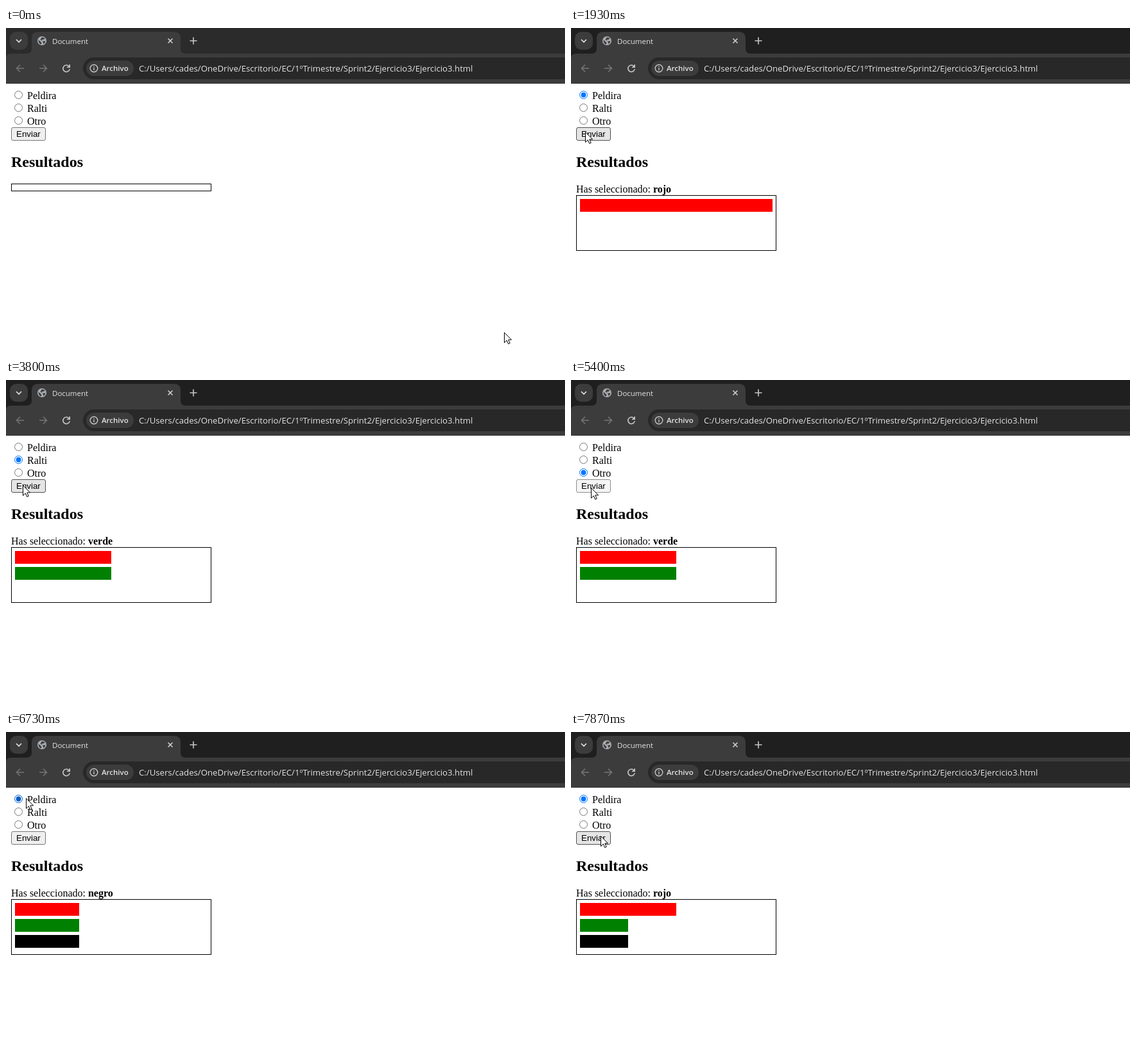
Recreate the animation shown at these times as an HTML page. Size 871 px wide and 506 px high, loop 8 s.

```html
<!DOCTYPE html>
<html lang="es">
<head>
<meta charset="utf-8">
<title>Document</title>
<style>
  html, body { margin: 0; width: 100%; height: 100%; overflow: hidden; background: #fff; }
  svg { display: block; cursor: default; user-select: none; }
  .ui { font-family: "Open Sans", "Noto Sans", sans-serif; fill: #e3e3e3; }
  .page { font: 16px "Liberation Serif", serif; }
  .bold { font-weight: bold; }
  .icon { fill: none; stroke: #c7c7c7; stroke-width: 1.6; }
  .off { stroke: #757575; }
</style>
</head>
<body>
<svg width="871" height="506" viewBox="0 0 871 506">
  <rect id="strip" width="871" height="50"/>
  <path fill="#3c3c3c" d="M0 87V48Q0 40 8 40H32Q40 40 40 32V16Q40 6 50 6H262Q272 6 272 16V32Q272 40 280 40H871V87Z"/>
  <rect x="6" y="6" width="28" height="28" rx="10" fill="#3c3c3c"/>
  <path class="icon" style="stroke:#e3e3e3" d="M16 18l4 4 4-4"/>

  <circle cx="56" cy="20" r="7" fill="#a9adb2"/>
  <path fill="#3c3c3c" d="M50.5 18.5l4 3.5 1 1.5-1 2.2q-4-1.5-4-7.200zM56 14.500l4.500 1.200-1 2-2.500 0 -1.500 2-2-1.500zM57 20.500l4.500 0q-.5 3-3 4.500z"/>
  <path class="icon" d="M252.500 16.500l7 7m0-7l-7 7M292 14.500v11M286.500 20h11"/>

  <g class="icon">
    <path class="off" d="M28 63H17M22 57.500L16.500 63l5.500 5.500M52 63h11M58 57.500l5.500 5.500-5.500 5.500"/>
    <path d="M98.500 60.500a5.200 5.200 0 1 0 .7 3.500M99.200 57v4.200h-4.200"/>
  </g>
  <rect x="120" y="46" width="780" height="34" rx="17" fill="#282828"/>
  <rect x="125" y="51" width="74" height="24" rx="12" fill="#3c3c3c"/>
  <circle class="icon" cx="137" cy="63" r="5.800" style="stroke-width:1.400"/>
  <path class="icon" style="stroke-width:1.400" d="M137 62v4M137 59.500v1.400"/>
  <g class="ui">
    <text x="72" y="25" font-size="11.500">Document</text>
    <text x="149" y="67" font-size="11.500" font-weight="600">Archivo</text>
    <text x="207" y="68" font-size="13.200">C:/Users/cades/OneDrive/Escritorio/EC/1ºTrimestre/Sprint2/Ejercicio3/Ejercicio3.html</text>
  </g>

  <g class="page">
    <g id="options"></g>
    <rect id="button" x="8.500" y="155.500" width="53" height="20" rx="2.500"/>
    <text x="16" y="170" style="font:13.333px 'Liberation Sans',sans-serif">Enviar</text>
    <text class="bold" x="8" y="217" font-size="24">Resultados</text>
    <text id="message" x="8" y="257">Has seleccionado: <tspan id="choice" class="bold"></tspan></text>
    <rect id="frame" x="8.500" width="311" fill="none" stroke="#000"/>
    <g id="bars"></g>
  </g>
  <path id="cursor" fill="#fff" stroke="#000" d="M.5.7V16.500L4.300 12.900 6.700 18.400 9.200 17.300 6.800 11.900H11.600Z"/>
</svg>
<script>
const $ = id => document.getElementById(id);
const LOOP = 8000, BUTTON = 3;
const labels = ["Peldira", "Ralti", "Otro"];
const colors = ["red", "green", "black"];
const colorNames = ["rojo", "verde", "negro"];

// [start, end, x, y]: pointer moves
const moves = [
  [0, 600, 11, 101], [730, 870, 15, 103], [1270, 1530, 22, 162],
  [2130, 2730, 22, 125], [3070, 3470, 26, 164], [4000, 4130, 28, 146],
  [4730, 5070, 31, 168], [5670, 6470, 31, 103], [6730, 7200, 40, 160],
  [7530, 7670, 43, 149], [7670, 7870, 46, 162]
];
// [press, release, target]: options 0-2 or the button
const clicks = [
  [1130, 1270, 0], [1800, 1930, BUTTON], [2870, 3000, 1], [3670, 3800, BUTTON],
  [4600, 4730, 2], [5400, 5530, BUTTON], [6600, 6730, 0], [7400, 7530, BUTTON]
];

$("options").innerHTML = labels.map((label, i) => `
  <g transform="translate(0 ${20 * i})">
    <circle class="ring" cx="19.500" cy="104.500" r="6" fill="#fff"/>
    <circle class="dot" cx="19.500" cy="104.500" r="3.900"/>
    <text x="33" y="111">${label}</text>
  </g>`).join("");
$("bars").innerHTML = colors.map((c, i) =>
  `<rect x="14" y="${267 + 25 * i}" height="20" fill="${c}"/>`).join("");
const rings = document.querySelectorAll(".ring");
const dots = document.querySelectorAll(".dot");
const bars = document.querySelectorAll("#bars rect");

function pointer(t) {
  let x = 776, y = 475;
  for (const [start, end, toX, toY] of moves) {
    const p = Math.min(1, Math.max(0, (t - start) / (end - start)));
    const ease = p * p * (3 - 2 * p);
    x += (toX - x) * ease;
    y += (toY - y) * ease;
  }
  return [Math.round(x), Math.round(y)];
}

function targetAt([x, y]) {
  if (x >= 8 && x < 62 && y >= 155 && y < 176) return BUTTON;
  if (x >= 8 && x < 78 && y >= 95 && y < 155) return Math.floor((y - 95) / 20);
  return -1;
}

function draw(t) {
  let selected = -1, last = -1, pressed = -1;
  const votes = [0, 0, 0];
  for (const [press, release, target] of clicks) {
    if (t >= press && t < release) pressed = target;
    if (t < release) continue;
    if (target === BUTTON) votes[last = selected]++;
    else selected = target;
  }
  const hovered = targetAt(pointer(t - 65));
  const pick = (i, normal, hover, active) =>
    i === pressed ? active : i === hovered ? hover : normal;

  $("strip").setAttribute("fill", t < 1130 ? "#2b2b2b" : "#1f1f1f");
  rings.forEach((ring, i) => {
    const blue = pick(i, "#0075ff", "#005cc8", "#3793ff");
    const grey = pick(i, "#767676", "#4f4f4f", "#8d8d8d");
    ring.setAttribute("stroke", i === selected ? blue : grey);
    dots[i].setAttribute("fill", i === selected ? blue : "none");
  });
  $("button").setAttribute("fill", pick(BUTTON, "#efefef", "#e5e5e5", "#f5f5f5"));
  $("button").setAttribute("stroke", pick(BUTTON, "#767676", "#4f4f4f", "#8d8d8d"));

  const voted = last >= 0, total = votes.reduce((a, b) => a + b);
  $("message").style.display = voted ? "" : "none";
  $("choice").textContent = voted ? colorNames[last] : "";
  $("frame").setAttribute("y", voted ? 261.5 : 243.5);
  $("frame").setAttribute("height", voted ? 86 : 11);
  bars.forEach((bar, i) => bar.setAttribute("width", voted ? 300 * votes[i] / total : 0));
  $("cursor").setAttribute("transform", `translate(${pointer(t)})`);
}

// The screen refreshes 15 times a second, on multiples of 10 ms
function tick() {
  const step = Math.floor((performance.now() % LOOP + 4) * 0.015);
  draw(Math.round(step * 100 / 15) * 10);
  requestAnimationFrame(tick);
}
tick();
</script>
</body>
</html>
```
